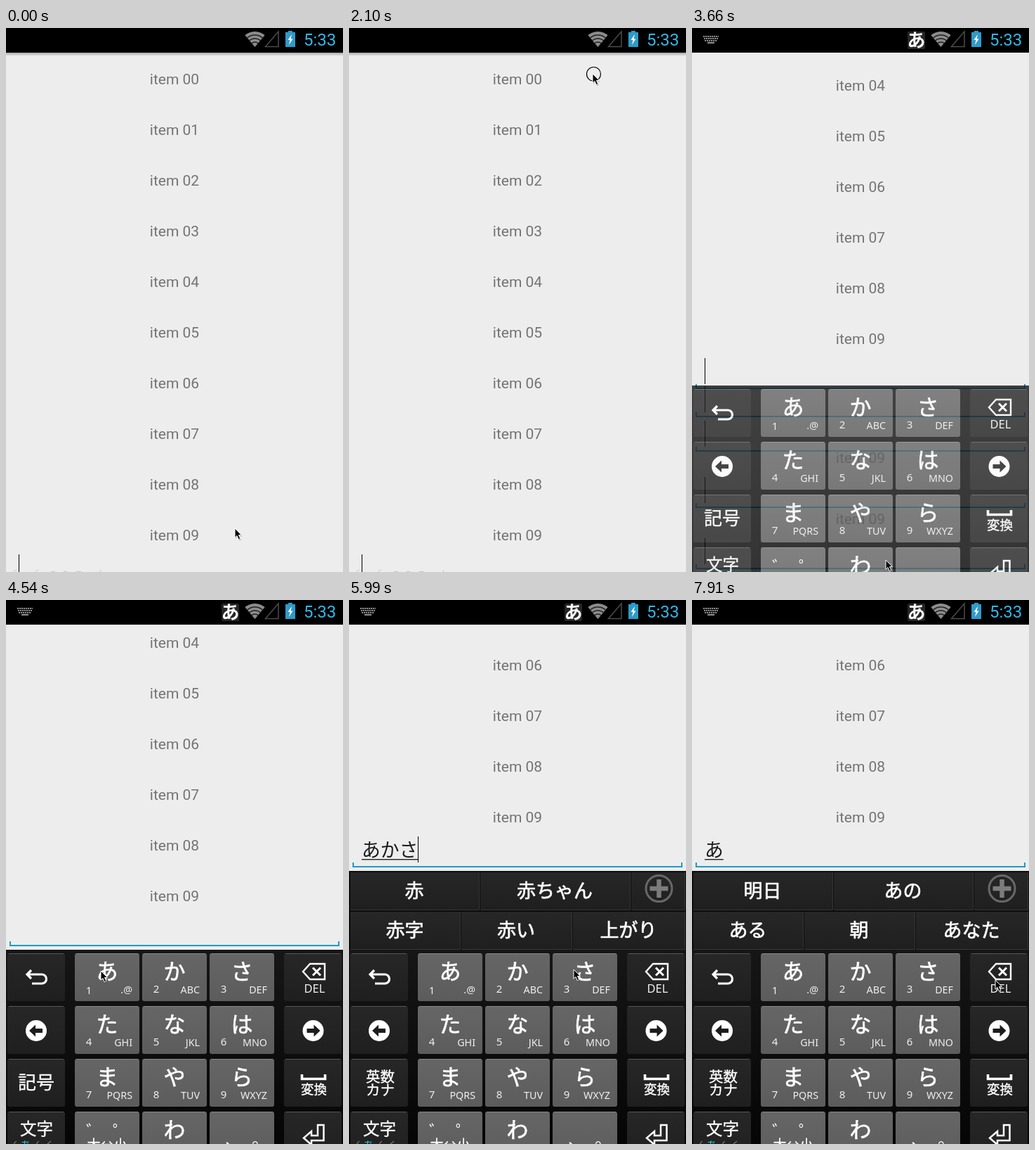
An HTML page that plays this animation: 480 px wide and 773 px high, repeating every 8000 ms.

```html
<!DOCTYPE html>
<html lang="ja">
<head>
<meta charset="utf-8">
<title>List with kana keyboard</title>
<style>
html, body { margin: 0; width: 100%; height: 100%; overflow: hidden; background: #ededed; }
svg { display: block; width: 100%; height: 100%; }
text { font-family: "Noto Sans CJK JP", "Noto Sans CJK", sans-serif; fill: #fff; white-space: pre; }
.mid { text-anchor: middle; }
.end { text-anchor: end; }
.ui { font-family: Roboto, sans-serif; }
.item { fill: #747474; font-size: 21px; }
.clock { fill: #33b5e5; font-size: 24px; }
.small { font-family: "Noto Sans", "Open Sans", sans-serif; fill: #f0f0f0; font-size: 14.3px; }
.kana, .cand, .label { stroke: #fff; stroke-width: .7px; }
.kana { font-size: 31px; }
.cand { font-size: 27px; }
.label { stroke-width: .35px; }
.word { font-size: 26.8px; fill: #1c1c1c; }
.line { fill: none; stroke: #fff; }
</style>
</head>
<body>
<svg id="stage" viewBox="0 0 480 773">
  <defs>
    <linearGradient id="mainKey" x2="0" y2="1"><stop stop-color="#666"/><stop offset="1" stop-color="#5c5c5c"/></linearGradient>
    <linearGradient id="sideKey" x2="0" y2="1"><stop stop-color="#272727"/><stop offset="1" stop-color="#1f1f1f"/></linearGradient>
    <linearGradient id="board" x2="0" y2="1"><stop stop-color="#161616"/><stop offset="1" stop-color="#040404"/></linearGradient>
    <linearGradient id="fade" x2="0" y2="1"><stop stop-opacity=".3"/><stop offset="1" stop-opacity="0"/></linearGradient>
    <clipPath id="fan"><path d="M354.5 27L338 7.3V4H371V7.3Z"/></clipPath>
  </defs>
  <rect width="480" height="773" fill="#ededed"/>
  <g id="list"></g>
  <rect id="topShade" y="35" width="480" height="5" fill="url(#fade)"/>
  <path id="edge" d="M11 773q1-3 4-3M42 773q1-3 4-3M64 772.5h6M82 772.5h5M100 772.5h7M134.5 770v3" fill="none" stroke="#c4c4c4"/>
  <g id="trail"></g>
  <g id="keyboard"></g>
  <g id="popup">
    <rect x="-52" y="380" width="104" height="117" rx="4" fill="#3a3a3a" stroke="#777"/>
    <text id="popupText" class="mid" y="455" font-size="46"></text>
  </g>
  <g id="status">
    <rect width="480" height="35"/>
    <g id="imeIcons">
      <g fill="none" stroke="#8c8c8c" stroke-width="2.2" stroke-dasharray="2.2 .8">
        <path d="M16 12H38M17 15H37M18 18H36"/><path d="M22 21H32" stroke-dasharray="none"/>
      </g>
      <rect x="307" y="5" width="25" height="25" rx="2" fill="#262626"/>
      <text class="mid" x="319.5" y="27" font-size="26" font-weight="700">あ</text>
    </g>
    <g clip-path="url(#fan)">
      <circle cx="354.5" cy="27" r="22" fill="#8c8c8c"/>
      <g fill="none" stroke="#222" stroke-width="1.6">
        <circle cx="354.5" cy="27" r="7"/><circle cx="354.5" cy="27" r="12"/><circle cx="354.5" cy="27" r="17"/>
      </g>
    </g>
    <path d="M388 5V26.5H369.5Z" fill="none" stroke="#4c4c4c" stroke-width="1.5"/>
    <path d="M402 4h6v2h4v21h-14V6h4Z" fill="#2f9bc9"/>
    <path d="M407 9l-5.5 8h3l-1.5 7 5.5-8.500h-3Z" fill="#fff"/>
    <text class="ui clock" x="424" y="25">5:33</text>
  </g>
  <g id="mouse">
    <circle id="ring" cx="1.5" cy=".5" r="10" fill="none" stroke="#000" stroke-width="1.2"/>
    <path d="M1 2V14.500L4 12 6.200 17.500 9 16.300 6.700 11.300H11Z" opacity=".22"/>
    <path d="M0 0V13.200L3 10.500 5.300 15.800 7.800 14.700 5.500 9.500H9.400Z" stroke="#fff"/>
  </g>
</svg>
<script>
const LOOP = 8000, LAST_Y = 720, KEY_TOP = 502;
const $ = id => document.getElementById(id);
const show = (el, on) => el.style.display = on ? '' : 'none';
const move = (el, x, y) => el.setAttribute('transform', `translate(${x} ${y})`);
const text = (x, y, str, cls, extra = '') => `<text x="${x}" y="${y}" class="${cls}" ${extra}>${str}</text>`;
const path = (d, width) => `<path class="line" d="${d}" stroke-width="${width}"/>`;

// ---- list and input field
const field = y => `<path d="M6 ${y + 65}V${y + 71}H474V${y + 65}" fill="none" stroke="#1f9acb" stroke-width="2" shape-rendering="crispEdges"/>`;
const caret = y => `<rect x="18" y="${y + 28}" width="1" height="37"/>`;
const item = (y, n) => text(240, y + 7.5, 'item 0' + n, 'mid ui item');

let rows = '';
for (let n = 0; n < 10; n++) rows += item(72 + 72 * n, n);
$('list').innerHTML = rows + field(LAST_Y) +
  text(18, LAST_Y + 57, '', 'word', 'id="word"') +
  `<rect id="under" x="18" y="${LAST_Y + 60}" height="1.4" fill="#222"/>` +
  `<g id="caret">${caret(LAST_Y)}</g>`;

// ---- keyboard
const COLS = [98, 194, 290];
const KEYS = [
  ['あ', '.@'], ['か', 'ABC'], ['さ', 'DEF'],
  ['た', 'GHI'], ['な', 'JKL'], ['は', 'MNO'],
  ['ま', 'PQRS'], ['や', 'TUV'], ['ら', 'WXYZ'],
  [''], ['わ', ''], ['']
];
const rowY = r => KEY_TOP + 75 * r;

function cap(x, y, w, fill, id = '') {
  return `<rect ${id} x="${x}" y="${y}" width="${w}" height="68" rx="3" fill="url(#${fill})"/>` +
    `<path d="M${x + 2} ${y + .5}h${w - 4}" stroke="#fff" opacity=".22"/>`;
}

function mainKey([kana, latin], i) {
  const x = COLS[i % 3], y = rowY(Math.floor(i / 3));
  let s = cap(x, y, 92, 'mainKey', `id="key${i}"`);
  if (kana) s += text(x + 46, y + 36.5, kana, 'mid kana');
  if (latin) s += text(x + 20, y + (i ? 56 : 58), i + 1, 'mid small', 'style="font-size:15px"') +
    text(x + 82, y + 57, latin, 'end small');
  return s;
}

const disc = (x, dir) => `<circle cx="${x}" cy="612" r="15" fill="#fff"/>` +
  `<path transform="translate(${x} 612) scale(${dir} 1)" d="M-10 0l9-8.500v5.500h10v6h-10v5.500Z" fill="#1c1c1c"/>`;

function sideKeys() {
  let s = '';
  for (let r = 0; r < 4; r++)
    s += cap(2, rowY(r), 82, 'sideKey') + cap(396, rowY(r), 82, 'sideKey', r ? '' : 'id="del"');
  return s +
    path('M36 526L30 532 36 538M30 532H51a6.500 6.500 0 0 1 0 13H37', 3.2) +
    disc(43, 1) + disc(437.5, -1) +
    `<g id="symbols">${text(43, 695, '記号', 'mid label', 'font-size="26"')}</g>` +
    `<g id="latin">${text(44.5, 685, '英数', 'mid label', 'font-size="20.5"')}${text(44.5, 704, 'カナ', 'mid label', 'font-size="20.5"')}</g>` +
    text(43.5, 760, '文字', 'mid label', 'font-size="23.5"') +
    text(28, 780, 'あ', 'mid', 'font-size="15" style="fill:#1ccfe0"') +
    `<path d="M11 775q1-5 4-6M43 775q1-5 4-6M64 769l-5 4" fill="none" stroke="#777" stroke-width="1.3"/>` +
    path('M423 528L433 517H454V539H433Z', 2.4) + path('M437 522.5l11 11m0-11l-11 11', 3) +
    text(439.5, 558, 'DEL', 'mid small', 'style="font-size:16.5px"') +
    path('M421.5 674V680.500H454.500V674', 3.6) +
    text(438.5, 701.5, '変換', 'mid label', 'font-size="18.5"') +
    path('M444 746H452.500V768H435V774L424 764.500 435 755V761H444Z', 2.5);
}

// ---- candidate rows
const CANDS = [
  [200, '明日', 'あの', 'ある', '朝', 'あなた'],
  [185, '赤', '赤ちゃん', '赤字', '赤い', '上がり'],
  [185, '赤さ', '明かさない', '赤錆', '明かさ', '赤砂糖']
];

function cell(x0, x1, y, str) {
  return `<rect x="${x0}" y="${y}" width="${x1 - x0}" height="53" fill="url(#sideKey)"/>` +
    `<path d="M${x0} ${y + 53.5}H${x1 + .5}V${y}" fill="none" stroke="#383838"/>` +
    text((x0 + x1) / 2 - .5, y + 36, str, 'mid cand');
}

function candidates([split, a, b, c, d, e], i) {
  return `<g id="cand${i}">` + cell(2, split, 387, a) + cell(split + 2, 400, 387, b) +
    cell(2, 158, 443, c) + cell(160, 317, 443, d) + cell(319, 478, 443, e) + '</g>';
}

$('keyboard').innerHTML =
  '<rect y="497" width="480" height="300" fill="url(#board)"/>' + sideKeys() + KEYS.map(mainKey).join('') +
  text(126, 764, '゛', 'mid', 'font-size="24"') + text(164, 764, '゜', 'mid', 'font-size="24"') +
  text(144, 781, '大↔小', 'mid label', 'font-size="19"') +
  text(312, 775, '、', '', 'font-size="25"') + text(350, 775, '。', '', 'font-size="25"') +
  '<g id="cands"><rect y="385" width="480" height="112" fill="#0c0c0c"/>' + CANDS.map(candidates).join('') +
  cell(402, 478, 387, '') +
  '<circle cx="441.5" cy="410" r="18.5" fill="none" stroke="#686868" stroke-width="3"/>' +
  '<path d="M441.5 397V423M428.5 410H454.5" stroke="#7c7c7c" stroke-width="6.5"/></g>';

// ---- timeline: each entry holds from its time on
const PAN = [[0, 720], [3350, 697], [3440, 610], [3510, 530], [3580, 481], [3660, 441], [3780, 420],
  [5070, 410], [5160, 372], [5250, 338], [5340, 316], [5430, 308]];
const SLIDE = [[0, 300, 0], [3350, 250, .15], [3440, 150, .35], [3510, 80, .5], [3580, 36, .65], [3660, 11, .8], [3780, 0, 1]];
const WORD = [[0, ''], [4980, 'あ'], [5430, 'あか'], [5900, 'あかさ'], [7010, 'あか'], [7460, 'あ']];
const CAND = [[0, -1], [4980, 0], [5540, 1], [6170, 2], [7100, 1], [7550, 0]];
const PRESS = [[0, ''], [4800, 'key0'], [4980, ''], [5340, 'key1'], [5430, ''], [5810, 'key2'], [5990, ''],
  [6920, 'del'], [7190, ''], [7370, 'del'], [7610, '']];
const TOUCH = [[0, 0], [1250, 1], [1390, 0], [1510, 1], [2250, 0], [3170, 1], [3260, 0]];
const BLINK = [[0, 1], [230, 0], [620, 1], [1250, 0], [1750, 1], [2250, 0], [2740, 1],
  [4170, 0], [4680, 1], [6500, 0], [6920, 1], [7910, 0]];
// pointer moves: first step, last step, number of steps, goal
const MOVES = [[60, 140, 2, 326, 712], [700, 1160, 6, 330, 491], [1660, 2100, 6, 347, 65], [2250, 2340, 2, 393, 36],
  [2430, 2840, 5, 318, 708], [2930, 3050, 2, 276, 756], [4170, 4530, 5, 135, 527], [4980, 5070, 2, 226, 525],
  [5630, 5720, 2, 320, 525], [6440, 6680, 4, 432, 540]];

const hold = (track, t) => track.filter(e => e[0] <= t).pop();
const at = (track, t) => hold(track, t)[1];

function pointer(t) {
  let x = 326, y = 711;
  for (const [t0, t1, n, gx, gy] of MOVES) {
    if (t < t0) break;
    const k = Math.min(n, 1 + Math.floor((t - t0) / (t1 - t0) * (n - 1) + 1e-6)) / n;
    const e = k * k * (3 - 2 * k);
    x += (gx - x) * e;
    y += (gy - y) * e;
  }
  return [x, y];
}

// stale copies of the field shine through while the keyboard slides in
const TRAIL = PAN.slice(1, 5);
$('trail').innerHTML = TRAIL.map(([, y]) => `<g>${field(y)}${caret(y)}${y > 600 ? item(y, 9) : ''}</g>`).join('');

function render(t) {
  const pan = at(PAN, t), word = at(WORD, t), cand = at(CAND, t), press = at(PRESS, t);
  const [, slide, alpha] = hold(SLIDE, t);

  move($('list'), 0, pan - LAST_Y);
  show($('topShade'), pan === LAST_Y);
  show($('edge'), pan === LAST_Y);
  $('word').textContent = word;
  $('under').setAttribute('width', 26.8 * word.length);
  move($('caret'), Math.floor(26.8 * word.length), 0);
  show($('caret'), at(BLINK, t));

  [...$('trail').children].forEach((g, i) => show(g, t < 3780 && t >= PAN[i + 2][0]));
  move($('keyboard'), 0, slide);
  $('keyboard').setAttribute('opacity', alpha);
  show($('imeIcons'), t >= 3260);
  show($('symbols'), !word);
  show($('latin'), word);
  show($('cands'), cand >= 0);
  CANDS.forEach((c, i) => show($('cand' + i), i === cand));

  for (const id of ['key0', 'key1', 'key2', 'del'])
    $(id).setAttribute('fill', id === press ? '#858585' : `url(#${id === 'del' ? 'sideKey' : 'mainKey'})`);
  const bubble = press.startsWith('key');
  show($('popup'), bubble);
  if (bubble) {
    const i = +press[3];
    move($('popup'), COLS[i] + 46, 0);
    $('popupText').textContent = KEYS[i][0];
  }

  move($('mouse'), ...pointer(t));
  show($('ring'), at(TOUCH, t) || press);
}

const start = performance.now();
function tick() {
  render((performance.now() - start) % LOOP);
  requestAnimationFrame(tick);
}
tick();
</script>
</body>
</html>
```
